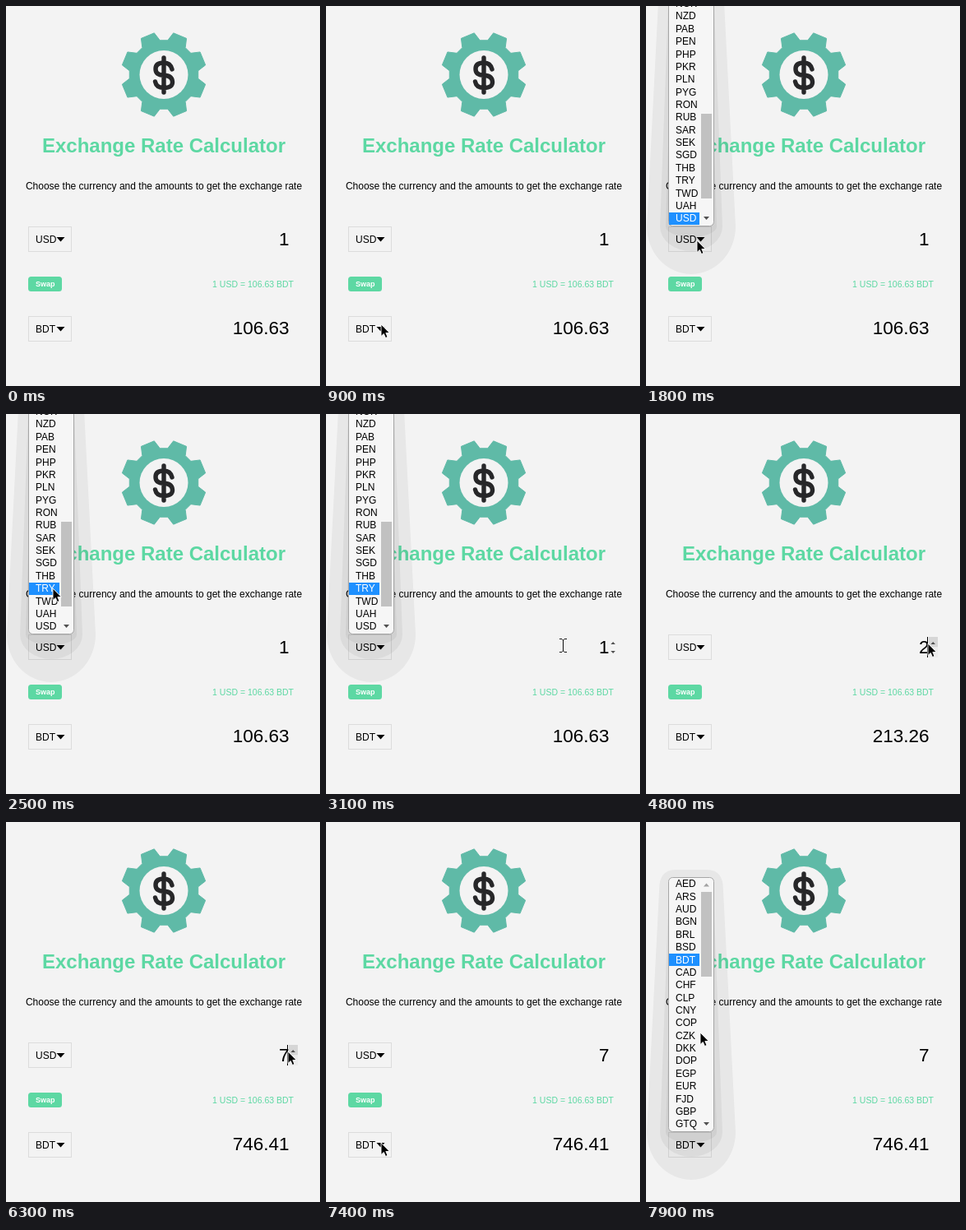
An HTML page for the animation above (8 s loop, 382 px wide and 462 px high).

```html
<!DOCTYPE html>
<html lang="en">
<head>
<meta charset="utf-8">
<title>Exchange Rate Calculator</title>
<style>
  html, body { margin: 0; width: 100%; height: 100%; overflow: hidden; background: #f3f3f3; }
  svg { display: block; font: 12px "Liberation Sans", Arial, sans-serif; }
  .green { fill: #5dd8a3; }
  .bold { font-weight: bold; }
  .num { font-size: 22.5px; text-anchor: end; }
  #beam path { fill: none; stroke: #000; }
  #beam path:first-child { stroke: #fff; stroke-width: 3; }
</style>
</head>
<body>
<svg width="382" height="462" viewBox="0 0 382 462">
  <path id="gear" fill="#5fbaa7" stroke="#5fbaa7" stroke-linejoin="round"/>
  <circle cx="192" cy="83.5" r="29.5" fill="#f3f3f3"/>
  <path d="M202 77Q200 69 192 69Q182 69 182 76.500T192 84.300T202.500 92T192 99.500Q183 99.500 181.500 92M192 63V105" fill="none" stroke="#272729" stroke-width="5.400" stroke-linecap="round"/>

  <text class="green bold" x="192" y="178" font-size="24" text-anchor="middle">Exchange Rate Calculator</text>
  <text x="192" y="223" text-anchor="middle">Choose the currency and the amounts to get the exchange rate</text>
  <g id="selects"></g>
  <rect class="green" x="27" y="329" width="41" height="18" rx="3.5"/>
  <text class="bold" x="36" y="341" font-size="9" fill="#fff">Swap</text>
  <text class="green" x="350" y="342" font-size="10.5" text-anchor="end">1 USD = 106.63 BDT</text>

  <text id="amount" class="num" x="344.5" y="291"></text>
  <text id="result" class="num" x="344.5" y="399"></text>
  <rect id="caret" y="271" width="1" height="25"/>
  <g id="spin"></g>
  <g id="fromMenu"></g>
  <g id="toMenu"></g>

  <path id="arrow" d="M0 0V14.500L3.300 11.500L5.500 16.500L8 15.400L5.800 10.500H10.300Z" stroke="#fff" stroke-width=".9"/>
  <g id="beam"></g>
</svg>
<script>
const $ = id => document.getElementById(id);
const show = (el, on) => el.style.display = on ? '' : 'none';
const within = (t, a, b) => t >= a && t < b;
const ROW = 15.37, RATE = 106.63, FROM_TOP = -42, TO_TOP = 67;

// Triangle with its flat side at y, pointing down (or up when h < 0)
const tri = (x, y, w, h, fill = '#000') => `<path d="M${x - w / 2} ${y}h${w}l${-w / 2} ${h}Z" fill="${fill}"/>`;
const rect = (x, y, w, h, fill, more = '') =>
  `<rect x="${x}" y="${y}" width="${w}" height="${h}" fill="${fill}" ${more}/>`;

// Eight tapered teeth around a round body
const point = (r, deg) => {
  const a = deg * Math.PI / 180;
  return `${192 + r * Math.sin(a)} ${83.5 - r * Math.cos(a)}`;
};
let gear = '';
for (let a = 22.5; a < 360; a += 45)
  gear += `L${point(42, a - 16)}L${point(52, a - 9.5)}L${point(52, a + 9.5)}L${point(42, a + 16)}`;
$('gear').setAttribute('d', 'M' + gear.slice(1) + 'Z');

const select = (code, y) => rect(27.5, y + .5, 52, 30, 'none', 'stroke="#dcdcdc"') +
  `<text x="36" y="${y + 19.5}">${code}</text>` + tri(66.5, y + 13, 10, 5.5);
$('selects').innerHTML = select('USD', 268) + select('BDT', 377);

$('spin').innerHTML =
  `<g id="pressed">${rect(344, 271, 11, 12.5, '#d6d6d6') + rect(344, 283.5, 11, 12.5, '#ececec')}</g>` +
  tri(349.2, 280, 5.5, -3, '#505050') + tri(349.2, 288, 5.5, 3, '#505050');

const beam = '<path d="M-4.500-8H-1.500L0-6.500L1.500-8H4.500M0-6.500V6.500M-4.500 8H-1.500L0 6.500L1.500 8H4.500"/>';
$('beam').innerHTML = beam + beam;

// One step of the soft shadow: narrow at the top, rounded at the bottom
function shadow(top, w, rise, drop) {
  const c = 55, n = w * .72, y = top - rise, end = top + 310;
  return `<path fill-opacity=".05" d="M${c - n} ${y + 24}Q${c - n} ${y} ${c - n / 2} ${y}H${c + n / 2}
    Q${c + n} ${y} ${c + n} ${y + 24}L${c + w} ${end}A${w} ${drop} 0 0 1 ${c - w} ${end}Z"/>`;
}

function buildMenu(el, top, codes, thumb) {
  const rows = codes.split(' ').map((code, i, all) => {
    const n = 20 - all.length + i, y = top + n * ROW;
    return `<g data-row="${n}">${rect(28, Math.round(y) + 1, 37, 15, '#1e90ff')}` +
      `<text x="36" y="${y + 12.3}">${code}</text></g>`;
  });
  el.innerHTML = shadow(top, 54, 9, 58) + shadow(top, 38, 0, 30) + shadow(top, 31, 0, 13) +
    rect(27.5, top + .5, 55, 309, '#f6f6f6', 'rx="5" stroke="#a6a6a6"') + rows.join('') +
    rect(67, thumb, 13, 103, '#c1c1c1') +
    tri(73.5, top + 11.5, 7, -4, '#a3a3a3') + tri(73.5, top + 298, 7, 4, '#505050');
}

function highlight(el, row) {
  for (const g of el.children) {
    if (!g.dataset.row) continue;
    const on = +g.dataset.row === row;
    show(g.firstChild, on);
    g.lastChild.style.fill = on ? '#fff' : '#000';
  }
}

buildMenu($('fromMenu'), FROM_TOP, 'NOK NZD PAB PEN PHP PKR PLN PYG RON RUB SAR SEK SGD THB TRY TWD UAH USD', 131);
buildMenu($('toMenu'), TO_TOP, 'AED ARS AUD BGN BRL BSD BDT CAD CHF CLP CNY COP CZK DKK DOP EGP EUR FJD GBP GTQ', 85);
highlight($('toMenu'), 6);

// Pointer moves: start, end, x, y; each one slows down towards its goal
const moves = [
  [200, 900, 67, 387], [900, 1500, 62, 285], [2000, 2400, 57, 212], [2500, 3100, 288, 281],
  [3100, 3300, 311, 283], [3800, 4100, 343, 279], [6700, 7000, 94, 380], [7100, 7300, 67, 390],
  [7600, 7900, 66, 256]
];

function pointer(t) {
  let x = 92, y = -20;
  for (const [start, end, toX, toY] of moves) {
    const k = 1 - (1 - Math.min(1, Math.max(0, (t - start) / (end - start)))) ** 2;
    x += (toX - x) * k;
    y += (toY - y) * k;
  }
  return [Math.round(x), Math.round(y)];
}

const clicks = [4800, 5500, 5800, 5900, 6100, 6300];

function draw(now) {
  const t = Math.floor(now % 8000 / 100) * 100;
  const amount = 1 + clicks.filter(c => t >= c).length;
  $('amount').textContent = amount;
  $('result').textContent = (amount * RATE).toFixed(2);

  show($('caret'), within(t, 3600, 4100) || within(t, 4800, 5400) || within(t, 5500, 6800));
  $('caret').setAttribute('x', t < 4800 ? 331 : 342);

  // The last row the pointer touched stays lit
  const hoverY = pointer(Math.min(t, 2400))[1];
  highlight($('fromMenu'), Math.min(19, Math.floor((hoverY - FROM_TOP) / ROW)));
  show($('fromMenu'), within(t, 1800, 3300));
  show($('toMenu'), t >= 7600);

  const [x, y] = pointer(t);
  const overInput = x > 240 && y > 268 && y < 299;
  const onSpin = overInput && x >= 343;
  show($('spin'), overInput);
  show($('pressed'), onSpin);
  show($('arrow'), !overInput || onSpin);
  show($('beam'), overInput && !onSpin);
  $('arrow').setAttribute('transform', `translate(${x} ${y})`);
  $('beam').setAttribute('transform', `translate(${x + .5} ${y + .5})`);
  requestAnimationFrame(() => draw(performance.now()));
}
draw(0);
</script>
</body>
</html>
```
